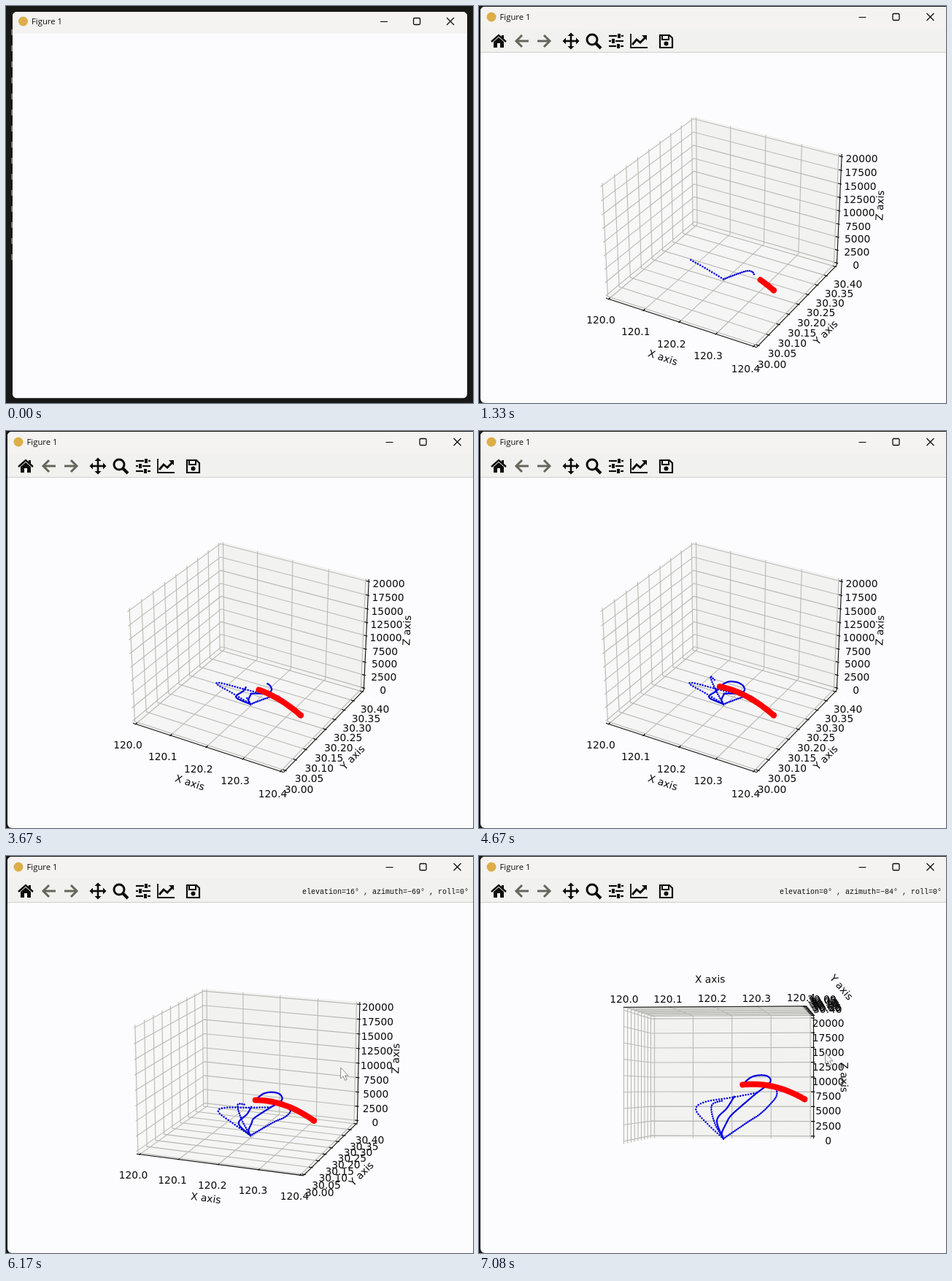
An HTML page with a canvas for the animation above (7160 ms loop, 640 by 544 pixels).

```html
<!DOCTYPE html>
<html lang="en">
<head>
<meta charset="utf-8">
<title>Figure 1</title>
<style>
  html, body { margin: 0; width: 100%; height: 100%; overflow: hidden; background: #181816; }
  canvas { display: block; width: 640px; height: 544px; }
</style>
</head>
<body>
<canvas id="stage" width="640" height="544"></canvas>
<script>
const ctx = document.getElementById('stage').getContext('2d');
const LOOP = 7160, STEP = 1000 / 12;
const INK = '#0c0c0c', PAPER = '#fcfcfe', CHROME = '#f1f1ef', GRID = '#b9b9b4';
const LABEL_FONT = '13.8px "DejaVu Sans", sans-serif';

// Half sizes of the data box, and the same with the pane margin added.
const HALF = [0.5714, 0.5714, 0.4286];
const EDGE = HALF.map(h => h * 25 / 24);
const TICKS = [
  { count: 5, text: i => (120 + i * 0.1).toFixed(1), title: 'X axis' },
  { count: 9, text: i => (30 + i * 0.05).toFixed(2), title: 'Y axis' },
  { count: 9, text: i => String(i * 2500), title: 'Z axis' }
];

const BASE = [0, 0, -0.4286];
const TURN = [0.2545, -0.283, -0.112];
const TRAILS = [
  { from: 250, to: 2580, gap: 3.6, pts: [BASE, [-.102, -.08, -.325], [-.17, -.17, -.227], [-.105, -.215, -.175], [.081, -.25, -.144], TURN] },
  { from: 250, to: 1650, gap: 2.6, pts: [BASE, [.171, 0, -.312], [.254, -.05, -.26], [.335, -.17, -.19], [.385, -.26, -.13], [.385, -.335, -.075]] },
  { from: 1400, to: 2580, gap: 2, pts: [BASE, [-.01, -.01, -.39], [.02, -.03, -.327], [.06, -.1, -.27], [.143, -.18, -.2], TURN] },
  { from: 2660, to: 4670, gap: 2, pts: [TURN, [.344, -.322, -.044], [.334, -.32, -.005], [.28, -.318, .005], [.217, -.327, -.01], [.163, -.34, -.058]] },
  { from: 2700, to: 3420, gap: 2, pts: [BASE, [-.029, -.15, -.3], [.043, -.175, -.215], [.099, -.23, -.134]] },
  { from: 3500, to: 4500, gap: 3, pts: [BASE, [-.06, -.01, -.32], [-.076, -.05, -.2], [.01, -.13, -.165]] }
];
// step, elevation, azimuth
const VIEWS = [[66, 30, -60], [74, 16, -69], [85, -0.5, -84]];

const clamp01 = v => Math.min(1, Math.max(0, v));
const rad = d => d * Math.PI / 180;

function viewAt(step) {
  const [a, b] = step < VIEWS[1][0] ? VIEWS : VIEWS.slice(1);
  const k = clamp01((step - a[0]) / (b[0] - a[0]));
  return { elev: a[1] + (b[1] - a[1]) * k, azim: a[2] + (b[2] - a[2]) * k };
}

function camera({ elev, azim }) {
  const ce = Math.cos(rad(elev)), se = Math.sin(rad(elev));
  const ca = Math.cos(rad(azim)), sa = Math.sin(rad(azim));
  return ([x, y, z]) => {
    const right = -sa * x + ca * y;
    const up = -se * ca * x - se * sa * y + ce * z;
    const depth = 10 - (ce * ca * x + ce * sa * y + se * z);
    return [335 + 1989 * right / depth, 302 - 1989 * up / depth];
  };
}

function trace(points) {
  ctx.beginPath();
  points.forEach(([x, y], i) => i ? ctx.lineTo(x, y) : ctx.moveTo(x, y));
}
function line(points, color = INK, width = 1.1) {
  trace(points);
  ctx.strokeStyle = color;
  ctx.lineWidth = width;
  ctx.stroke();
}
function poly(points, color) {
  trace(points);
  ctx.fillStyle = color;
  ctx.fill();
}
function disc(x, y, r, color) {
  ctx.beginPath();
  ctx.arc(x, y, r, 0, 7);
  ctx.fillStyle = color;
  ctx.fill();
}
function label(text, x, y, font, align = 'left') {
  ctx.font = font;
  ctx.textAlign = align;
  ctx.fillStyle = INK;
  ctx.fillText(text, x, y);
}

function drawAxes(project, elev) {
  const pane = [-1, 1, elev < 0 ? 1 : -1];
  const at = (...signs) => signs.map((s, i) => s * EDGE[i]);
  const [px, py, pz] = pane;

  const faces = [
    [[at(px, -1, -1), at(px, 1, -1), at(px, 1, 1), at(px, -1, 1)], '#f8f8f8'],
    [[at(-1, py, -1), at(1, py, -1), at(1, py, 1), at(-1, py, 1)], '#f2f2f1'],
    [[at(-1, -1, pz), at(1, -1, pz), at(1, 1, pz), at(-1, 1, pz)], '#f5f5f5']
  ];
  for (const [corners, color] of faces) poly(corners.map(project), color);

  // Each grid line bends once across the two panes that meet its axis.
  const bends = [
    [at(0, -py, pz), at(0, py, pz), at(0, py, -pz)],
    [at(-px, 0, pz), at(px, 0, pz), at(px, 0, -pz)],
    [at(px, -py, 0), at(px, py, 0), at(-px, py, 0)]
  ];
  const axes = [at(0, -py, pz), at(-px, 0, pz), at(-px, py, 0)];
  const tickDir = [1, 0, 0];
  const place = (p, axis, v) => p.map((c, i) => i === axis ? v : c);
  const tickValue = (axis, i) => HALF[axis] * (2 * i / (TICKS[axis].count - 1) - 1);
  const outward = (p, axis, amount) => p.map((c, i) =>
    i === axis ? c : c + Math.sign(c) * amount * 2 * HALF[i]);

  TICKS.forEach(({ count }, axis) => {
    for (let i = 0; i < count; i++)
      line(bends[axis].map(p => project(place(p, axis, tickValue(axis, i)))), GRID);
  });

  TICKS.forEach(({ count, text, title }, axis) => {
    const base = axes[axis], dir = tickDir[axis];
    const a = project(place(base, axis, -EDGE[axis]));
    const b = project(place(base, axis, EDGE[axis]));
    line([a, b]);
    for (let i = 0; i < count; i++) {
      const p = place(base, axis, tickValue(axis, i));
      const shift = k => place(p, dir, p[dir] + Math.sign(p[dir]) * k * HALF[dir] / 6);
      line([project(shift(0.1)), project(shift(-0.2))]);
      const [x, y] = project(outward(p, axis, 0.09));
      label(text(i), x, y + 11.3, LABEL_FONT, 'center');
    }
    let angle = (Math.atan2(a[1] - b[1], b[0] - a[0]) * 180 / Math.PI + 180) % 180;
    if (angle > 90) angle -= 180;
    const [x, y] = project(outward(base, axis, 0.188));
    ctx.save();
    ctx.translate(x, y);
    ctx.rotate(-rad(angle));
    label(title, 0, 4.5, LABEL_FONT, 'center');
    ctx.restore();
  });
}

function curvePoint(pts, u) {
  const i = Math.min(Math.floor(u), pts.length - 2), f = u - i;
  const p1 = pts[i], p2 = pts[i + 1], p0 = pts[i - 1] || p1, p3 = pts[i + 2] || p2;
  return p1.map((b, k) => {
    const a = p0[k], c = p2[k], d = p3[k];
    return b + 0.5 * f * (c - a + f * (2 * a - 5 * b + 4 * c - d + f * (3 * (b - c) + d - a)));
  });
}

function drawTrails(project, time) {
  ctx.lineCap = ctx.lineJoin = 'round';
  disc(...project(BASE), 1.1, '#0000e0');
  for (const { from, to, gap, pts } of TRAILS) {
    const end = clamp01((time - from) / (to - from)) * (pts.length - 1);
    if (!end) continue;
    const count = Math.ceil(end * 14);
    const path = Array.from({ length: count + 1 }, (_, i) => project(curvePoint(pts, end * i / count)));
    ctx.setLineDash([0.1, gap]);
    line(path, '#0000dc', 2.5);
  }
  ctx.setLineDash([]);

  const reach = 0.412 * clamp01((time - 250) / 4420);
  const target = Array.from({ length: 31 }, (_, i) => {
    const s = reach * i / 30;
    return project([0.575 - s, -0.333, -0.1545 + 0.58 * s - 0.842 * s * s]);
  });
  disc(...target[0], 4, '#f00');
  line(target, '#f00', 8);
  ctx.lineCap = 'butt';
  ctx.lineJoin = 'miter';
}

function drawTitle(x, y, minX, maxX, closeX) {
  disc(x - 11.5, y, 6.5, '#dcae48');
  label('Figure 1', x, y + 4, '11.3px "Open Sans", "Noto Sans", sans-serif');
  line([[minX - 5, y + .5], [minX + 5, y + .5]]);
  ctx.lineWidth = 1.3;
  ctx.beginPath();
  ctx.roundRect(maxX - 4.5, y - 4.5, 9, 9, 1.5);
  ctx.stroke();
  line([[closeX - 5, y - 5], [closeX + 5, y + 5]], INK, 1.2);
  line([[closeX + 5, y - 5], [closeX - 5, y + 5]], INK, 1.2);
}

function icon(x, draw) {
  ctx.save();
  ctx.translate(x, 48);
  draw();
  ctx.restore();
}
const arrow = (dir, color) => () => {
  line([[0, -8], [-8 * dir, 0], [0, 8]], color, 3);
  line([[-8 * dir, 0], [9 * dir, 0]], color, 3);
};

function drawToolbar() {
  icon(27, () => {
    line([[-10, 1], [0, -8], [10, 1]], INK, 2.4);
    poly([[-7, 1], [0, -5], [7, 1], [7, 9], [2, 9], [2, 3], [-2, 3], [-2, 9], [-7, 9]], INK);
    ctx.fillRect(4, -8, 3, 5);
  });
  icon(59, arrow(1, '#66665c'));
  icon(89, arrow(-1, '#66665c'));
  icon(126, () => {
    line([[-9, 0], [9, 0]], INK, 2.6);
    line([[0, -9], [0, 9]], INK, 2.6);
    for (let i = 0; i < 4; i++) {
      poly([[-4.5, -7], [0, -11.5], [4.5, -7]], INK);
      ctx.rotate(Math.PI / 2);
    }
  });
  icon(157, () => {
    ctx.beginPath();
    ctx.arc(-2, -2, 7, 0, 7);
    ctx.strokeStyle = INK;
    ctx.lineWidth = 3;
    ctx.stroke();
    line([[3, 3], [10, 10]], INK, 4);
  });
  icon(188, () => [[-7, 4], [0, -4], [7, 3]].forEach(([y, knob]) => {
    line([[-10, y], [10, y]], INK, 2.2);
    ctx.fillStyle = CHROME;
    ctx.fillRect(knob - 3, y - 2, 6, 4);
    ctx.fillStyle = INK;
    ctx.fillRect(knob - 2, y - 3, 4, 6);
  }));
  icon(219, () => {
    line([[-11, -10], [-11, 9], [12, 9]], INK, 1.8);
    line([[-9, 5], [-3, -2], [2, 2], [9, -5]], INK, 2.8);
    poly([[4, -8], [11, -8], [11, -1]], INK);
  });
  icon(256, () => {
    line([[-8, -8], [5, -8], [9, -4], [9, 9], [-8, 9], [-8, -9]], INK, 2.2);
    line([[-5, -8], [-5, -2], [4, -2], [4, -8]], INK, 2);
    disc(0.5, 3.5, 3, INK);
  });
}

function drawWindow(x, y, w, h, barHeight) {
  ctx.save();
  ctx.beginPath();
  ctx.roundRect(x, y, w, h, 6);
  ctx.clip();
  ctx.fillStyle = PAPER;
  ctx.fillRect(x, y, w, h);
  ctx.fillStyle = CHROME;
  ctx.fillRect(x, y, w, barHeight);
  ctx.fillStyle = '#f4f3f1';
  ctx.fillRect(x, y, w, 30);
  ctx.restore();
}

function drawCursor(x, y) {
  const shape = [[0, 0], [0, 15], [3.5, 12], [6, 17.5], [8.5, 16.5], [6, 11], [10.5, 11], [0, 0]]
    .map(([dx, dy]) => [x + dx, y + dy]);
  poly(shape, PAPER);
  line(shape, '#8c8c88', 1);
}

function render(step) {
  const time = step * STEP;
  ctx.fillStyle = '#181816';
  ctx.fillRect(0, 0, 640, 544);

  if (step === 0) {
    ctx.fillStyle = '#70706a';
    for (let y = 32; y < 350; y += 22) ctx.fillRect(7, y, 2, 8);
    drawWindow(9, 8, 623, 529.5, 28);
    drawTitle(35, 21, 518, 563, 609);
    return;
  }

  drawWindow(2, 1, 646, 543, 62.5);
  line([[2, 63.5], [640, 63.5]], '#d0d0cc', 1);
  drawTitle(28.5, 15, 525.5, 571.5, 618.5);
  drawToolbar();
  if (step < 2) return;

  const view = viewAt(step), project = camera(view);
  drawAxes(project, view.elev);
  drawTrails(project, time);
  if (step > 66) {
    const elev = Math.round(view.elev), azim = Math.round(-view.azim);
    label(`elevation=${elev}° , azimuth=−${azim}° , roll=0°`, 634, 52,
      '10px "Liberation Mono", monospace', 'right');
    drawCursor(449 - (view.azim + 60) * 1.07, 307 - (30 - view.elev) * 1.22);
  }
}

let shown = -1;
function tick() {
  const time = performance.now() % LOOP;
  const step = Math.min(85, Math.floor((time + 4) / STEP));
  if (step !== shown) render(shown = step);
  requestAnimationFrame(tick);
}
tick();
</script>
</body>
</html>
```
